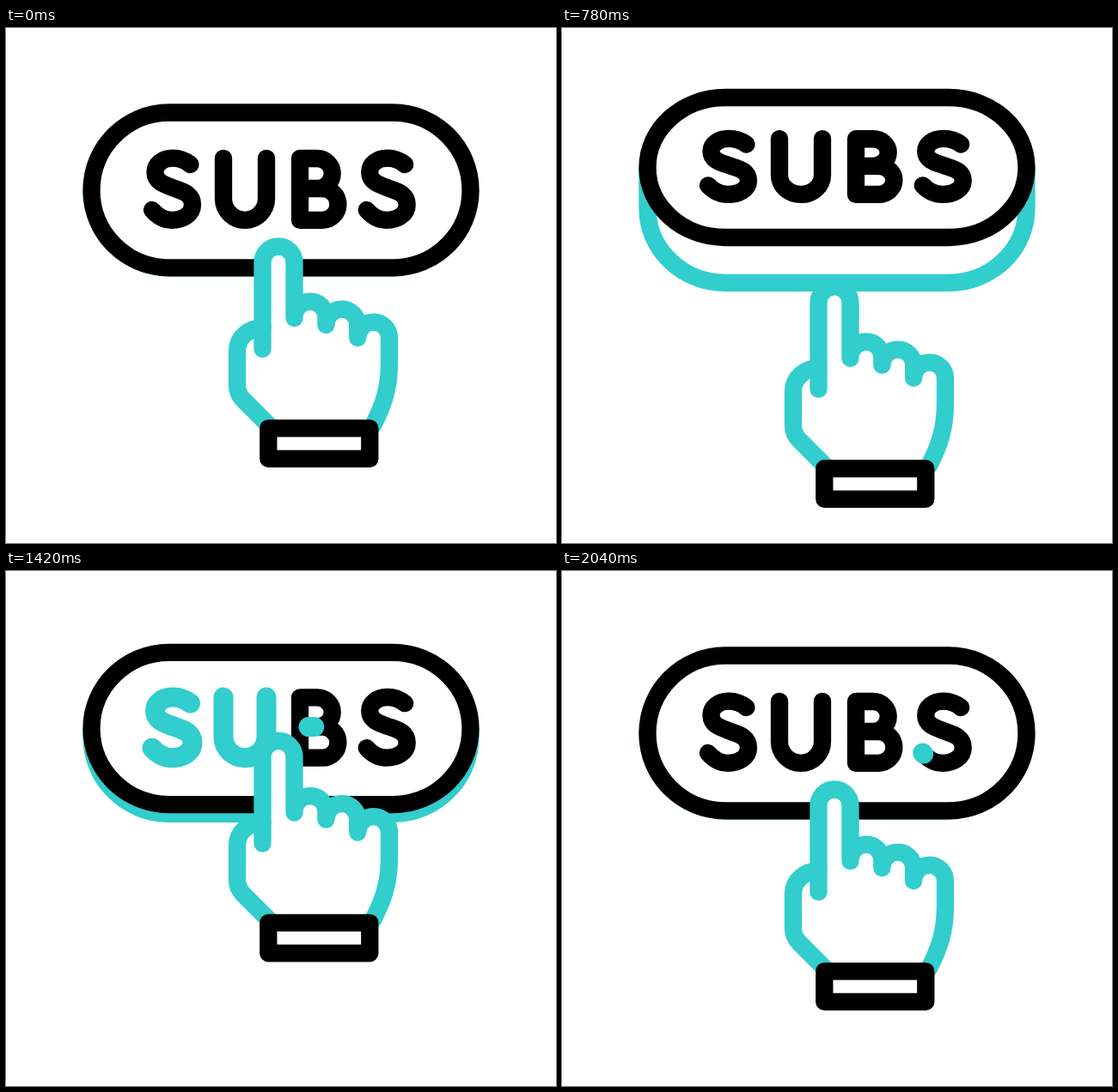
Animation, 640 px wide and 600 px high, one loop 2400 ms. Source, as an HTML page:

```html
<!DOCTYPE html>
<html lang="en">
<head>
<meta charset="utf-8">
<title>Subs button</title>
<style>
  html, body { margin: 0; width: 100%; height: 100%; overflow: hidden; background: #fff; }
  svg { display: block; width: 640px; height: 600px; }
  path, rect { stroke-width: 20.3; stroke-linecap: round; stroke-linejoin: round; fill: none; stroke: #000; }
  .teal { stroke: #32cdcd; }
  .solid { fill: #fff; }
  .blank { fill: #fff; stroke: none; }
  #inks path { stroke-width: 23; }
</style>
</head>
<body>
<svg viewBox="0 0 640 600" role="img" aria-label="SUBS">
  <path id="side" class="teal solid" style="stroke-linecap:butt"/>
  <path id="face" class="solid"/>
  <g id="letters"></g>
  <g id="inks"></g>
  <g id="hand">
    <path id="palm" class="blank"/>
    <path id="thumb" class="teal"/>
    <path id="fingers" class="teal"/>
    <rect class="solid" x="305.3" y="466.3" width="118" height="35.6"/>
  </g>
</svg>
<script>
const LOOP = 2400;
const $ = id => document.getElementById(id);

// Flat pose of the button; every coordinate is an "x,y" pair
const sShape = dx => "M214.5,159 C207,153 200,151.7 194,151.7 C182,151.7 173.5,159 173.5,168 " +
  "C173.5,180 186,183 195,186.5 C206,190.5 217,193 217,206 C217,217 206,223.8 193,223.8 C183,223.8 176,219 170,212"
  .replace(/$/, "") && shiftX(
  "M214.5,159 C207,153 200,151.7 194,151.7 C182,151.7 173.5,159 173.5,168 " +
  "C173.5,180 186,183 195,186.5 C206,190.5 217,193 217,206 C217,217 206,223.8 193,223.8 C183,223.8 176,219 170,212", dx);

function mapPairs(d, fn) {
  return d.replace(/([\d.]+),([\d.]+)/g, (_, x, y) => fn(+x, +y).map(n => n.toFixed(2)).join());
}
function shiftX(d, dx) {
  return mapPairs(d, (x, y) => [x + dx, y]);
}

const word = [
  sShape(0),
  "M253,151.8 L253,198.8 C253,212.6 264.2,223.8 278,223.8 C291.8,223.8 303,212.6 303,198.8 L303,151.8",
  "M352,187 L362,187 C371.7,187 379.7,179.2 379.7,169.5 C379.7,159.8 371.7,152 362,152 L342,152 " +
    "L342,223.8 L368,223.8 C378.2,223.8 386.4,215.6 386.4,205.4 C386.4,195.2 378.2,187 368,187 L342,187",
  sShape(249.7)
];
const pill = "M190,98.5 L450,98.5 C500,98.5 540.5,139 540.5,189 C540.5,239 500,279.3 450,279.3 " +
  "L190,279.3 C140,279.3 99.5,239 99.5,189 C99.5,139 140,98.5 190,98.5 Z";

const thumb = "M306,463 L276,433 Q269,426 269,416 V376 C269,361 282,349.5 298.5,349.5";
const index = "V273 A18.5 18.5 0 0 1 335.5 273 V338";
const rest = "V337 A18.4 18.4 0 0 1 372.4 337 V346 A18.4 18.4 0 0 1 409.2 346 " +
  "V361 A18.4 18.4 0 0 1 446 361 V390 C446,420 439,440 427,463";
$("thumb").setAttribute("d", thumb);
$("fingers").setAttribute("d", `M298.5,374 ${index} ${rest}`);
$("palm").setAttribute("d", `${thumb} ${index} ${rest} Z`);

function addPath(group, cls) {
  const p = document.createElementNS("http://www.w3.org/2000/svg", "path");
  p.setAttribute("class", cls);
  return $(group).appendChild(p);
}
const letters = word.map(() => addPath("letters", ""));
const inks = word.map(() => addPath("inks", "teal"));

const clamp = n => Math.min(1, Math.max(0, n));
const linear = (t, from, to) => clamp((t - from) / (to - from));
const smooth = (t, from, to) => {
  const x = linear(t, from, to);
  return x * x * (3 - 2 * x);
};
const mix = (a, b, k) => a + (b - a) * k;

// Straight moves of the hand: [time, y offset]
const handSteps = [[762, 52], [1250, -78], [1620, -31.5], [1850, 0]];

function handY(t) {
  if (t < handSteps[0][0]) return 52 * smooth(t, 0, 515);
  for (let i = 1; i < handSteps.length; i++) {
    const [t0, y0] = handSteps[i - 1], [t1, y1] = handSteps[i];
    if (t < t1) return mix(y0, y1, linear(t, t0, t1));
  }
  return 0;
}

function drawButton(lift) {
  const tilt = y => y * mix(1, 0.9015, lift) - 7.8 * lift;
  const squash = d => mapPairs(d, (x, y) => [x, tilt(y)]);
  $("face").setAttribute("d", squash(pill));
  word.forEach((d, i) => {
    const shape = squash(d);
    letters[i].setAttribute("d", shape);
    inks[i].setAttribute("d", shape);
  });

  const top = tilt(189), mid = mix(189, 210, lift), low = mix(279.3, 296.8, lift);
  const bend = mid + (low - mid) * 0.552;
  $("side").setAttribute("d", `M99.5,${top} V${mid} C99.5,${bend} 140,${low} 190,${low} ` +
    `H450 C500,${low} 540.5,${bend} 540.5,${mid} V${top}`);
}

// Colour runs along the word, then its tail follows
function drawInk(t) {
  const lengths = inks.map(p => p.getTotalLength());
  const total = lengths.reduce((a, b) => a + b);
  const head = total * linear(t, 1257, 1623);
  const tail = total * linear(t, 1655, 2042);
  let start = 0;
  inks.forEach((p, i) => {
    const len = lengths[i];
    const a = Math.min(len, Math.max(0, tail - start));
    const b = Math.min(len, Math.max(0, head - start));
    p.style.display = b > a ? "" : "none";
    p.style.strokeDasharray = `${b - a} ${len + 60}`;
    p.style.strokeDashoffset = -a;
    start += len;
  });
}

function draw() {
  const t = performance.now() % LOOP;
  drawButton(smooth(t, 0, 515) - smooth(t, 1120, 1545));
  drawInk(t);
  $("hand").setAttribute("transform", `translate(0 ${handY(t)})`);
  requestAnimationFrame(draw);
}
draw();
</script>
</body>
</html>
```
